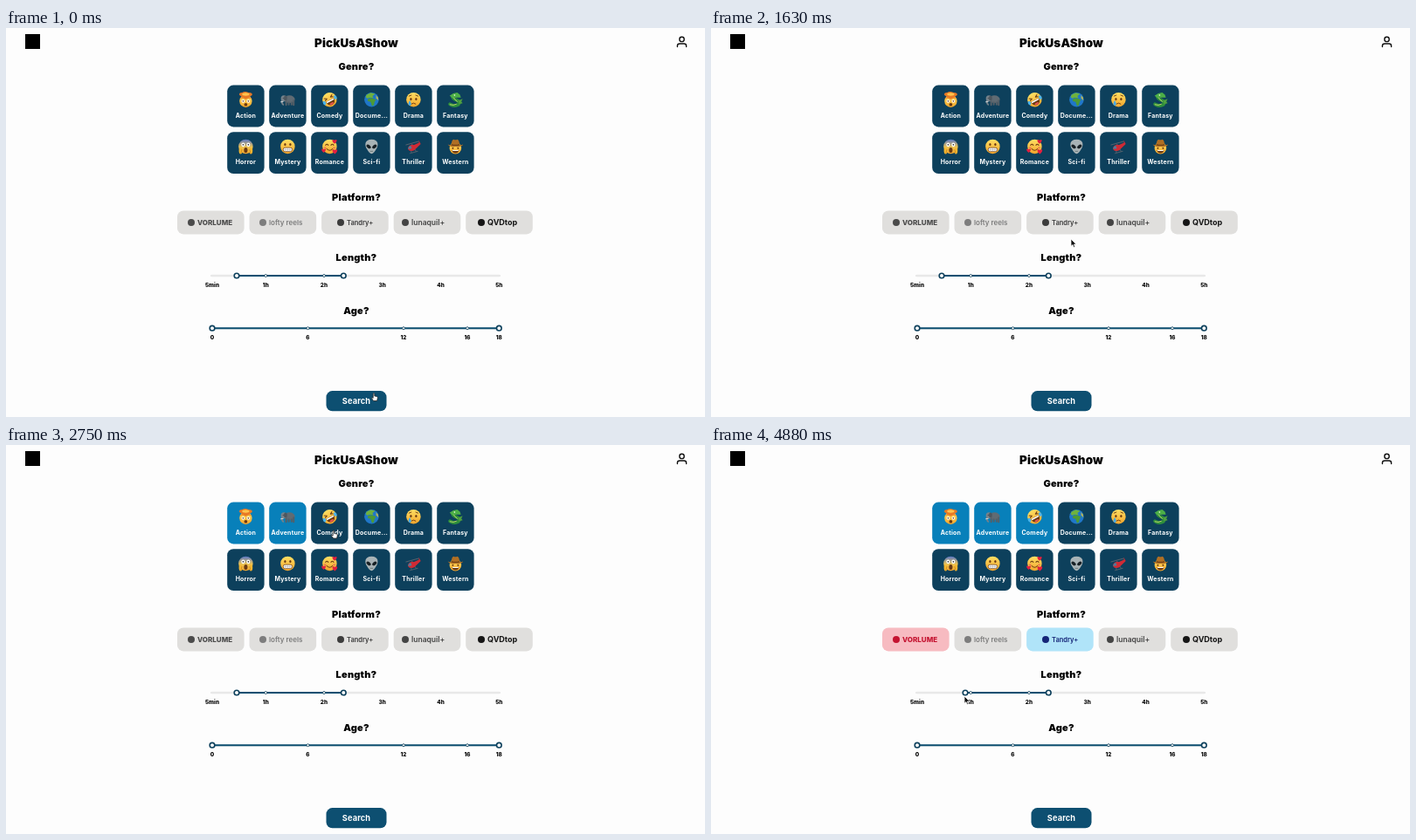
Write an HTML page that moves like this. It is 800 px wide and 446 px high and loops after 5010 ms.

```html
<!DOCTYPE html>
<html lang="en">
<head>
<meta charset="utf-8">
<title>PickUsAShow</title>
<style>
  html, body { margin: 0; width: 100%; height: 100%; overflow: hidden; background: #fdfdfd; }
  svg { display: block; width: 100vw; height: 100vh; }
  text { font-family: Inter, "Open Sans", sans-serif; font-weight: 700; }
  .mid { text-anchor: middle; }
  .title { font-size: 13.4px; font-weight: 900; letter-spacing: .15px; }
  .head { font-size: 11px; font-weight: 900; letter-spacing: .2px; }
  .tick { font-size: 6.4px; font-weight: 800; letter-spacing: .1px; }
  .label { font-size: 7px; letter-spacing: .2px; fill: #fff; }
  .action { font-size: 9.2px; letter-spacing: .15px; fill: #fff; }
  .note { font-size: 7.7px; font-weight: 500; letter-spacing: .12px; }
  .blurred { filter: blur(.9px); }
  #panel { filter: drop-shadow(0 6px 9px rgba(0, 0, 0, .2)); }
</style>
</head>
<body>
<svg viewBox="0 0 800 446">
  <defs>
    <linearGradient id="skin" x2="0" y2="1">
      <stop offset="0" stop-color="#ffe063"/><stop offset="1" stop-color="#f3a52c"/>
    </linearGradient>
    <linearGradient id="scream" x2="0" y2="1">
      <stop offset="0" stop-color="#5877c9"/><stop offset=".55" stop-color="#efc451"/><stop offset="1" stop-color="#f3a52c"/>
    </linearGradient>
  </defs>
  <g id="page"></g>
  <g id="modal"></g>
  <g id="cursor"></g>
</svg>
<script>
const $ = id => document.getElementById(id);
const NAVY = '#0d4f71', DARK = '#0d405c', BRIGHT = '#0880ba', GREY = '#e0dfdd';

// Markup helpers
const rect = (x, y, w, h, r, fill, more = '') =>
  `<rect x="${x}" y="${y}" width="${w}" height="${h}" rx="${r}" fill="${fill}" ${more}/>`;
const dot = (x, y, r, fill, more = '') => `<circle cx="${x}" cy="${y}" r="${r}" fill="${fill}" ${more}/>`;
const oval = (x, y, rx, ry, fill) => `<ellipse cx="${x}" cy="${y}" rx="${rx}" ry="${ry}" fill="${fill}"/>`;
const fillPath = (d, fill) => `<path d="${d}" fill="${fill}"/>`;
const stroke = (d, color, width, more = '') =>
  `<path d="${d}" fill="none" stroke="${color}" stroke-width="${width}" stroke-linecap="round" stroke-linejoin="round" ${more}/>`;
const text = (x, y, s, cls, more = '') => `<text x="${x}" y="${y}" class="${cls}" ${more}>${s}</text>`;

// Emoji, centred on 0,0 and about 17 wide
const BROWN = '#6b3a12';
const face = (parts, skin = 'url(#skin)') => dot(0, 0, 8, skin) + parts;
const eyes = (y, rx, ry, fill = BROWN) => oval(-2.9, y, rx, ry, fill) + oval(2.9, y, rx, ry, fill);
const heart = (x, y, s) =>
  `<path transform="translate(${x} ${y}) scale(${s})" d="M0 3C-5-1-2.5-4 0-1.6C2.5-4 5-1 0 3Z" fill="#e3203f"/>`;

const emoji = {
  blast: dot(0, 1.5, 7, 'url(#skin)') +
    fillPath('M-7 -1L-4 -3L-7 -5Q-8 -8 -4 -8Q-1 -10 3 -8Q8 -8 7 -5L4 -3L7 -1L3 -2L0 -.5L-3 -2Z', '#e87925') +
    oval(0, -6, 4, 1.6, '#ffc44d') + eyes(1.6, 1.8, 1.8, '#fff') + eyes(1.6, .8, .8) + oval(0, 5.4, 1.8, 1.8, BROWN),
  elephant: oval(2, -.5, 6, 4.2, '#606b73') + oval(-4.3, -1.5, 3.2, 3.4, '#76828b') +
    oval(-2.4, -1.7, 1.8, 2.8, '#4d575f') + stroke('M-6.4 0Q-7 4 -5 5.5', '#76828b', 1.7) +
    stroke('M-1.7 2V5.8M1.2 3V5.3M4.3 3V5.3M6.6 1V5.8', '#545f67', 2) +
    stroke('M-5 2L-7.6 2.5', '#eee', .8) + dot(-5, -2, .5, '#222'),
  rofl: `<g transform="rotate(-28)">` + face(stroke('M-4.8 -3.8L-2.2 -2.2L-4.8 -1.2M4.8 -3.8L2.2 -2.2L4.8 -1.2', BROWN, 1) +
    fillPath('M-5 .5H5Q4.5 6.3 0 6.3Q-4.5 6.3 -5 .5Z', BROWN) + rect(-4.4, .6, 8.8, 1.5, .6, '#fff') +
    oval(0, 5, 2.4, 1.1, '#e8554f') + oval(-6.8, .6, 1.6, 2.3, '#49b4ee') + oval(6.8, .6, 1.6, 2.3, '#49b4ee')) + '</g>',
  globe: face(fillPath('M-5.5 -5.5L-1 -7.6L4 -6.5L1 -4L2 -2L-2 -2.5L-5 -1.5L-6.5 -3Z', '#6fb23d') +
    fillPath('M-4 -1L0 -1.8L5 0L3.5 2L2.5 6L.5 7L-1 2.5L-4.3 1.5Z', '#4d9a35') +
    fillPath('M5 -5L7.3 -2.5L7.5 1L5 -2Z', '#b5b557'), '#2077c9'),
  cry: face(eyes(-.7, 1.1, 1.5) + stroke('M-5 -4L-2.5 -5M5 -4L2.5 -5M-2.4 4.7Q0 2.6 2.4 4.7', BROWN, .9) +
    fillPath('M-4 .8Q-7 4.5 -4.8 6.7Q-1.8 6.7 -2.8 4Z', '#42a9e8')),
  dragon: stroke('M-6 5Q-1 8 3 5.5Q6 2 0 0Q-5 -2 -1 -5', '#2f8f3c', 3.8) +
    fillPath('M-4 -2L-6.5 -4.5L-2.5 -7L2 -8L5 -5.5L6 -2.5L2 -2.5Z', '#4caf47') +
    fillPath('M3 1L8 -1L6.5 2L8 4L4 5Z', '#4f9f3f') + stroke('M-6 5.5Q-2 7 1 5M-2 -2Q-1 0 2 2', '#c5d96c', .9) + dot(-1, -5, .8, '#ffe'),
  scream: face(eyes(-2, 2, 2.3, '#fff') + eyes(-2, .8, .8, '#222') + oval(0, 4, 2, 3, BROWN) +
    oval(-5.7, 4.8, 1.9, 3.5, '#f5b731') + oval(5.7, 4.8, 1.9, 3.5, '#f5b731') +
    stroke('M-4.3 3.5L-5.4 7.4M4.3 3.5L5.4 7.4', '#bd741b', .6), 'url(#scream)'),
  grimace: face(eyes(-2.3, 1.1, 1.5) + rect(-5, 1.2, 10, 4.4, 2, '#fff', `stroke="${BROWN}" stroke-width=".7"`) +
    stroke('M-4.7 3.4H4.7M-2.4 1.4V5.4M0 1.4V5.4M2.4 1.4V5.4', '#999', .45)),
  love: face(stroke('M-4.5 -1.5Q-3 -3.7 -1.5 -1.5M1.5 -1.5Q3 -3.7 4.5 -1.5M-3.2 2.5Q0 6 3.2 2.5', BROWN, 1) +
    oval(-5, 1.3, 1.5, 1, '#f08050') + oval(5, 1.3, 1.5, 1, '#f08050')) +
    heart(5.5, -5.5, .85) + heart(-6.6, 4.5, .8) + heart(5.8, 5.5, .95),
  alien: fillPath('M0 -8C8 -8 8 -1 5 3Q2.5 8 0 8Q-2.5 8 -5 3C-8 -1 -8 -8 0 -8Z', '#a9b3b6') +
    `<g transform="rotate(35 -3.2 0)">${oval(-3.2, 0, 2.9, 1.8, '#182025')}</g>` +
    `<g transform="rotate(-35 3.2 0)">${oval(3.2, 0, 2.9, 1.8, '#182025')}</g>` + stroke('M-1.3 5.3H1.3', '#566', .7),
  copter: `<g transform="rotate(-16)">` + stroke('M-7.5 -4H7M-1 -4V-2', '#53616d', .9) + oval(-2, 1, 4.6, 3.4, '#cf2b35') +
    fillPath('M0 -1.5L7 -2.5L7.5 -5L8.5 -.5L2 3Z', '#cf2b35') + fillPath('M-6.4 1Q-5.5 -2 -2.5 -1.7V1.6Z', '#4d7d9c') +
    stroke('M-6 6.3H3M-4 4V6.3M1 4V6.3', '#53616d', .9) + '</g>',
  cowboy: dot(0, 1.7, 6.6, 'url(#skin)') + eyes(1.9, .9, 1) + fillPath('M-4 4H4Q3 7.4 0 7.4Q-3 7.4 -4 4Z', BROWN) +
    rect(-3.4, 4, 6.8, 1, .4, '#fff') +
    fillPath('M-8.5 -2.3Q-6 -1.2 -4.7 -1.8Q-4 -8 -2 -8Q0 -7 2 -8Q4 -8 4.7 -1.8Q6 -1.2 8.5 -2.3Q7 .8 0 .2Q-7 .8 -8.5 -2.3Z', '#b06f24') +
    stroke('M-4.4 -2.2Q0 -1 4.4 -2.2', '#643a14', 1)
};

const genres = [
  ['Action', 'blast'], ['Adventure', 'elephant'], ['Comedy', 'rofl'], ['Docume...', 'globe'], ['Drama', 'cry'], ['Fantasy', 'dragon'],
  ['Horror', 'scream'], ['Mystery', 'grimace'], ['Romance', 'love'], ['Sci-fi', 'alien'], ['Thriller', 'copter'], ['Western', 'cowboy']
];
const genreTile = ([name, icon], i) => {
  const x = 253.2 + i % 6 * 48, y = i < 6 ? 65.6 : 119.3, mid = x + 21.2;
  return rect(x, y, 42.4, 47.8, 7, DARK, `id="genre${i}"`) +
    `<g transform="translate(${mid} ${y + 16.6}) scale(1.03)">${emoji[icon]}</g>` +
    text(mid, y + 37, name, 'label mid');
};

// name, left edge, font size, weight, colour
const platforms = [
  ['VORLUME', 208, 8, 800, '#4b4b4b'],
  ['lofty reels', 290, 8, 600, '#7d7d7d'],
  ['Tandry+', 379, 7.5, 600, '#3c3c3c'],
  ['lunaquil+', 453, 8.5, 600, '#444'],
  ['QVDtop', 540, 9, 700, '#161616']
];
const platformTile = ([name, left, size, weight, color], i) =>
  rect(196 + i * 82.55, 209.4, 76.6, 27, 7, GREY, `id="platform${i}"`) +
  `<g id="brand${i}" fill="${color}"><circle cx="${left + 4}" cy="223" r="4"/>` +
  text(left + 11, 223 + size * .36, name, '', `style="font-size:${size}px;font-weight:${weight}"`) + '</g>';

const knob = (x, y, id) => dot(x, y, 2.8, '#fff', `id="${id}" stroke="${DARK}" stroke-width="1.6"`);
const slider = (y, from, to, ticks, dots, id) =>
  rect(234, y - 1.3, 332, 2.6, 1.3, '#e8e8e8') +
  stroke(`M${from} ${y}H${to}`, NAVY, 2, `id="${id}Bar"`) +
  dots.map(x => dot(x, y, 1.5, '#fff', `stroke="${DARK}" stroke-width=".8"`)).join('') +
  knob(from, y, id + 'From') + knob(to, y, id + 'To') +
  ticks.map(([x, s]) => text(x, y + 12.5, s, 'tick mid')).join('');

const button = (y, s) => rect(366.5, y, 69, 23.2, 7, NAVY) + text(401, y + 15.1, s, 'action mid');

$('page').innerHTML =
  rect(22, 7, 17, 17, 0, '#000') +
  text(401, 21.5, 'PickUsAShow', 'title mid') +
  dot(773.5, 12.9, 2.7, 'none', 'stroke="#111" stroke-width="1.4"') +
  stroke('M768.4 21.6V20.6Q768.4 18 771 18H776Q778.6 18 778.6 20.6V21.6', '#111', 1.4) +
  [['Genre?', 48.4], ['Platform?', 198.4], ['Length?', 267.4], ['Age?', 327.8]]
    .map(([s, y]) => text(401, y, s, 'head mid')).join('') +
  genres.map(genreTile).join('') +
  platforms.map(platformTile).join('') +
  slider(284, 264, 386.3, [[236, '5min'], [297.3, '1h'], [364, '2h'], [430.8, '3h'], [497.5, '4h'], [564.3, '5h']], [297.3, 364], 'length') +
  slider(344.2, 236, 564.3, [[236, '0'], [345.5, '6'], [455, '12'], [528, '16'], [564.3, '18']], [345.5, 455, 528], 'age') +
  button(416.1, 'Search');

$('modal').innerHTML =
  rect(201.7, 173.7, 399, 91.3, 9, '#fff', `id="panel" stroke="${NAVY}" stroke-width="1.5"`) +
  dot(401, 195, 9.8, 'none', 'stroke="#741a1f" stroke-width="1.8"') +
  stroke('M401 190V196M401 199.4V199.5', '#741a1f', 1.8) +
  text(401, 218.6, 'Please select at least 1 genre.', 'note mid') +
  button(231.8, 'OK');

$('cursor').innerHTML =
  `<path id="arrow" d="M0 0V8.2L1.9 6.5L3.2 9.4L4.6 8.8L3.4 6H6Z" fill="#111" stroke="#fff" stroke-width=".7"/>` +
  `<path id="hand" d="M-.8 5V.6Q0 -.6 .8 .6V3.4L3.6 4Q4.6 4.4 4.3 6L3.6 9H-.4L-2.6 6Q-2.4 4.6 -.8 5.8Z"
    fill="#fff" stroke="#222" stroke-width=".8" stroke-linejoin="round"/>`;

// Pointer path: step, x, y, 1 = hand
const path = [
  [0, 421, 418.5, 1], [6, 416, 427, 1], [7, 416, 427, 0], [8, 415.8, 427, 0], [10, 411, 245, 1],
  [12, 410, 244, 1], [13, 412, 242, 0], [15, 419.6, 237.8, 0], [17, 370, 172, 0], [19, 282, 101, 1], [20, 275, 98, 1],
  [21, 323, 99, 1], [22, 375, 98, 1], [24, 374, 100, 1], [25, 330, 150, 0], [27, 247.5, 220, 1],
  [28, 247, 221, 1], [30, 406, 222, 1], [31, 405, 223, 1], [32, 365, 246, 0], [33, 317.7, 273, 0],
  [35, 264, 285, 0], [39, 290, 288, 0]
];
const MODAL = [7, 13], GENRE_PICK = [21, 22, 23], DRAG = [35, 39];
const LOOP = 5010, LAST = 39;

const mix = (a, b, k) => a + (b - a) * k;
const stepStart = n => Math.round(n * 12.5) * 10;
function stepAt(ms) {
  const n = Math.floor(ms / 125);
  return Math.min(LAST, stepStart(n) > ms ? n - 1 : n);
}

function pointer(n) {
  const i = path.findLastIndex(p => p[0] <= n);
  const a = path[i], b = path[i + 1] || a;
  const k = b === a ? 0 : (n - a[0]) / (b[0] - a[0]);
  return [mix(a[1], b[1], k), mix(a[2], b[2], k), a[3]];
}

function tint(i, picked, back, color) {
  $('platform' + i).setAttribute('fill', picked ? back : GREY);
  $('brand' + i).setAttribute('fill', picked ? color : platforms[i][4]);
}

function draw(n) {
  const open = n >= MODAL[0] && n < MODAL[1];
  $('modal').style.display = open ? '' : 'none';
  $('page').classList.toggle('blurred', open);

  GENRE_PICK.forEach((at, i) => $('genre' + i).setAttribute('fill', n >= at ? BRIGHT : DARK));
  tint(0, n >= 28, '#f7bbc1', '#c51431');
  tint(2, n >= 31, '#b0e4f9', '#152578');

  const k = Math.max(0, (n - DRAG[0]) / (DRAG[1] - DRAG[0]));
  const from = mix(264, 291, k);
  $('lengthFrom').setAttribute('cx', from);
  $('lengthBar').setAttribute('d', `M${from} 284H386.3`);

  const [x, y, hand] = pointer(n);
  $('cursor').setAttribute('transform', `translate(${x} ${y})`);
  $('hand').style.display = hand ? '' : 'none';
  $('arrow').style.display = hand ? 'none' : '';
}

const start = performance.now();
function tick() {
  draw(stepAt((performance.now() - start) % LOOP));
  requestAnimationFrame(tick);
}
tick();
</script>
</body>
</html>
```
